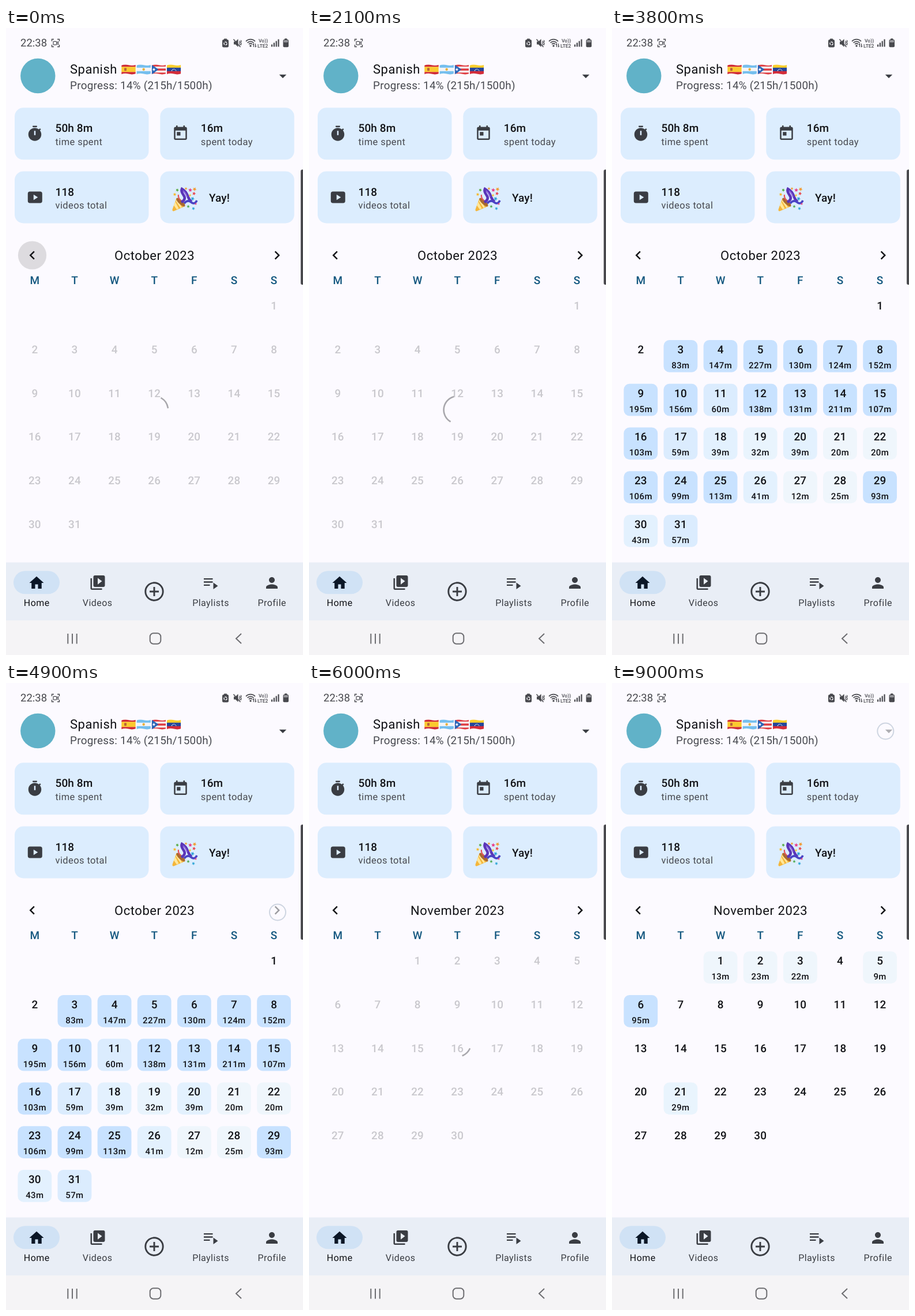
An HTML page that plays this animation: 515x1087 px, repeating every 9.1 s.

```html
<!DOCTYPE html>
<html lang="en">
<head>
<meta charset="utf-8">
<title>Watch time calendar</title>
<style>
  html, body { margin: 0; width: 100%; height: 100%; overflow: hidden; background: #fcfaff; }
  svg { display: block; width: 100%; height: 100%; font-family: Roboto, "Noto Sans", sans-serif; }
  text { text-rendering: geometricPrecision; }
  .mid { text-anchor: middle; }
  .bold { font-weight: 500; }
</style>
</head>
<body>
<svg id="stage" viewBox="0 0 515 1087" xmlns="http://www.w3.org/2000/svg"></svg>
<script>
const LOOP = 9100, STEP = 100;
const INK = "#111216", ICON = "#3a3d43", SOFT = "#47494f", SYSTEM = "#6d6d71";

const text = (s, x, y, size, fill, spacing = 0, cls = "") =>
  `<text x="${x}" y="${y}" font-size="${size}" fill="${fill}" letter-spacing="${spacing}" class="${cls}">${s}</text>`;
const box = (x, y, w, h, r, fill) =>
  `<rect x="${x}" y="${y}" width="${w}" height="${h}" rx="${r}" fill="${fill}"/>`;
const shape = (d, fill, extra = "") => `<path d="${d}" fill="${fill}" ${extra}/>`;
const line = (d, color, width, extra = "") =>
  `<path d="${d}" fill="none" stroke="${color}" stroke-width="${width}" ${extra}/>`;
const icon = (d, cx, cy, fill = ICON, scale = 1.25) =>
  `<path d="${d}" fill="${fill}" fill-rule="evenodd" transform="translate(${cx} ${cy}) scale(${scale}) translate(-12 -12)"/>`;
const group = (id, body, hidden) => `<g id="${id}"${hidden ? ' display="none"' : ""}>${body}</g>`;

const ICONS = {
  timer: "M15 1H9v2h6V1zm-4 13h2V8h-2v6zm8.03-6.61 1.42-1.42c-.43-.51-.9-.99-1.41-1.41l-1.42 1.42C16.07 4.74 14.12 4 12 4c-4.97 0-9 4.03-9 9s4.02 9 9 9 9-4.03 9-9c0-2.12-.74-4.07-1.97-5.61z",
  today: "M19 3h-1V1h-2v2H8V1H6v2H5c-1.1 0-2 .9-2 2v14c0 1.1.9 2 2 2h14c1.1 0 2-.9 2-2V5c0-1.1-.9-2-2-2zm0 16H5V8h14v11zM7 10h5v5H7z",
  play: "M5 4h14a3 3 0 0 1 3 3v10a3 3 0 0 1-3 3H5a3 3 0 0 1-3-3V7a3 3 0 0 1 3-3zm5 4.2v7.6l6-3.8z",
  prev: "M15.41 7.41 14 6l-6 6 6 6 1.41-1.41L10.83 12z",
  next: "M8.59 16.59 10 18l6-6-6-6-1.41 1.41L13.17 12z",
  drop: "M7 10l5 5 5-5z",
  home: "M10 20v-6h4v6h5v-8h3L12 3 2 12h3v8z",
  library: "M4 6H2v14c0 1.1.9 2 2 2h14v-2H4V6zm16-4H8c-1.1 0-2 .9-2 2v12c0 1.1.9 2 2 2h12c1.1 0 2-.9 2-2V4c0-1.1-.9-2-2-2zm-8 12.5v-9l6 4.5-6 4.5z",
  person: "M12 12c2.21 0 4-1.79 4-4s-1.79-4-4-4-4 1.79-4 4 1.79 4 4 4zm0 2c-2.67 0-8 1.34-8 4v2h16v-2c0-2.66-5.33-4-8-4z"
};

function statusBar() {
  const c = "#48494e";
  const bars = [4, 7, 10, 13].map((h, i) => box(460 + i * 3.8, 32.5 - h, 2.2, h, .5, c)).join("");
  const waves = [4, 7.5, 11].map(r => {
    const d = r * .72;
    return line(`M${424 - d} ${31 - d}A${r} ${r} 0 0 1 ${424 + d} ${31 - d}`, c, 1.7);
  }).join("");
  return text("22:38", 25, 32.3, 18.5, c) +
    line("M79.5 23v-3.5h3.5M89 19.5h3.5v3.5M92.5 29v3.5h-3.5M83 32.5h-3.5v-3.5", c, 1.4) +
    group("camera", `<rect x="82" y="23.3" width="5.8" height="5.8" rx="1" fill="none" stroke="${c}" stroke-width="1.2"/>` +
      line("M88 25.5l2.6-1.7v4.8l-2.6-1.7", c, 1.1)) +
    box(375, 20, 11, 13.5, 2.5, c) + box(378, 18.5, 5, 2, .5, c) +
    `<circle cx="380.5" cy="26.8" r="2.6" fill="none" stroke="#fcfaff" stroke-width="1.4" stroke-dasharray="4 1.4"/>` +
    shape("M395 23.5h3l4.5-4.5v14l-4.5-4.5h-3z", c) +
    line("M394.5 19.5l12 13.5", c, 1.5) +
    line("M404.5 22.5l1.5 1.5-1.5 2 1.5 2-1.5 2M407 21l1.2 2-1.2 2 1.2 2-1.2 3", c, 1.2) +
    waves + `<circle cx="424" cy="31" r="1.7" fill="${c}"/>` +
    line("M429.5 33v-5.5l-1.5 1.5M432.5 27v5.5l1.5-1.5", c, 1.2) +
    text("Vo))", 438, 24.5, 8.5, c, 0, "bold") + text("LTE2", 436, 33.5, 8.5, c, -.1, "bold") +
    bars + box(480.5, 20, 9.5, 13.3, 2, c) + box(483, 18.3, 4.5, 2.5, .5, c) +
    box(481.5, 21, 7.5, 4, 1, "#96969b");
}

function flags() {
  const stripes = (colors, heights) => {
    let y = -1;
    return colors.map((c, i) => {
      const h = heights[i], s = box(0, y, 25, h + .2, 0, c);
      y += h;
      return s;
    }).join("");
  };
  const list = [
    stripes(["#d02a35", "#fbc92e", "#d02a35"], [5, 9, 6]) + box(5, 6, 4, 5, 1, "#b9633a"),
    stripes(["#75bfee", "#f4f5f7", "#75bfee"], [6.5, 6, 7]) + `<circle cx="12.5" cy="8.5" r="2.2" fill="#e8b03c"/>`,
    stripes(["#df3b40", "#f6f4f5", "#df3b40", "#f6f4f5", "#df3b40"], [4.5, 3.5, 3.5, 3.5, 5]) +
      shape("M0 0L12 8.5 0 18z", "#2c65b7") +
      shape("M4 5.5l.8 2.1h2.2l-1.8 1.4.7 2.2L4 9.9l-1.9 1.3.7-2.2L1 7.6h2.2z", "#fff"),
    stripes(["#fbce2d", "#23469b", "#d32d3b"], [6.5, 6, 7]) +
      line("M8.5 11Q12.5 5 16.5 11", "#fff", 1.3, 'stroke-dasharray="1.3 1.1"')
  ];
  const wave = "M.3 1.5Q6-.8 12.5.9T24.7.8V16Q19 18 12.5 16.3T.3 16.7z";
  return `<clipPath id="wave"><path d="${wave}"/></clipPath>` +
    list.map((f, i) => `<g transform="translate(${200 + i * 26.2} 63.3)"><g clip-path="url(#wave)">${f}</g></g>`).join("");
}

function popper() {
  const star = (x, y, r, fill, turn = 0) => {
    const pts = Array.from({ length: 10 }, (_, i) => {
      const a = turn + i * Math.PI / 5, q = i % 2 ? r * .48 : r;
      return `${(x + q * Math.sin(a)).toFixed(1)},${(y - q * Math.cos(a)).toFixed(1)}`;
    });
    return `<polygon points="${pts.join(" ")}" fill="${fill}"/>`;
  };
  return shape("M289 317Q288 316 288.7 314L295.5 295Q305 299 310.5 309L291.5 317.3Q290 318 289 317z", "#f4b63a") +
    shape("M293.5 301l6 12-3.500 1.500-5-7zM297 297l8 14-2.500 1-8-12z", "#ffe79a") +
    `<ellipse cx="303" cy="302" rx="3.600" ry="10" transform="rotate(-46 303 302)" fill="#a9692f"/>` +
    line("M304 302Q313 297 308 290T305 279Q312 283 315 291T322 301", "#5a35b8", 4.6) +
    line("M307 282Q312 286 314 293", "#8b63dc", 1.8) +
    line("M309 304Q315 297 321 302T331 299", "#4a43c4", 3.6) +
    line("M303 299Q298 294 299 289", "#e6525c", 2.2) +
    star(292.5, 288.5, 3, "#f6b92e", .2) + star(297, 281, 3, "#59ad45", .4) +
    star(312, 278.5, 2.6, "#f19d36", .4) + star(319.5, 281, 3.6, "#e7418d", .1) +
    star(327, 279.5, 3.6, "#f19d36", .5) + star(326, 287, 3.2, "#e84951", .3) +
    star(319, 290, 2.6, "#f4c934", .2) + star(323.5, 296, 3.6, "#37a4d8", .4) +
    star(316, 309.5, 2.8, "#53ad56", .1) + star(325, 313, 3, "#33a8d7", .5) +
    star(329, 305, 2.2, "#e94b81", .2);
}

function cards() {
  const card = (x, y, big, small) => box(x, y, 232.5, 90, 15, "#dcedfe") +
    text(big, x + 70.5, y + 42, 19, INK, .1, "bold") + text(small, x + 70.5, y + 64.5, 16.5, SOFT, .4);
  return card(15, 138.3, "50h 8m", "time spent") + card(267.3, 138.3, "16m", "spent today") +
    card(15, 248.5, "118", "videos total") + box(267.3, 248.5, 232.5, 90, 15, "#dcedfe") +
    text("Yay!", 352, 301.3, 19, INK, .1, "bold") +
    icon(ICONS.timer, 50, 183.3) + icon(ICONS.today, 302.5, 182.8) + icon(ICONS.play, 50.3, 293.5) + popper();
}

const colX = col => 49.8 + col * 69.13;
const rowY = row => 465.2 + row * 75.75;
const SHADES = [[75, "#c8e2ff"], [45, "#dbecfe"], [35, "#e3f1fe"], [27, "#e9f4fd"], [0, "#eff6fc"]];

function month(first, days, minutes) {
  let out = "";
  for (let day = 1; day <= days; day++) {
    const slot = first + day - 1, x = colX(slot % 7), y = rowY(Math.floor(slot / 7));
    const m = minutes && minutes[day];
    if (m) {
      out += box(x - 29.4, y, 58.8, 55.8, 10, SHADES.find(s => m >= s[0])[1]) +
        text(m + "m", x, y + 49, 15, INK, .4, "mid bold");
    }
    out += text(day, x, y + 23, 18.9, minutes ? INK : "#c9c8cd", .1, "mid bold");
  }
  return out;
}

const OCT = [0, 0, 0, 83, 147, 227, 130, 124, 152, 195, 156, 60, 138, 131, 211, 107, 103, 59, 39, 32, 39,
  20, 20, 106, 99, 113, 41, 12, 25, 93, 43, 57];
const NOV = { 1: 13, 2: 23, 3: 22, 5: 9, 6: 95, 21: 29 };

function calendar() {
  const week = [..."MTWTFSS"].map((d, i) => text(d, colX(i), 444.3, 19, "#12577f", 0, "mid bold")).join("");
  const title = (id, s) => group(id, text(s, 257.6, 402.3, 22, INK, .55, "mid"), true);
  return `<circle id="ripple" cy="394" fill="#000"/>` +
    icon(ICONS.prev, 45.5, 394, INK) + icon(ICONS.next, 470, 394, INK) + week +
    title("octTitle", "October 2023") + title("novTitle", "November 2023") +
    group("octWait", month(6, 31), true) + group("octDone", month(6, 31, OCT), true) +
    group("novWait", month(2, 30), true) + group("novDone", month(2, 30, NOV), true) +
    `<path id="spinner" fill="none" stroke="#a8a7ac" stroke-width="2.6" stroke-linecap="square"/>`;
}

function tabs() {
  const label = (s, x, fill = ICON) => text(s, x, 1002.3, 16, fill, .45, "mid");
  return box(0, 926.5, 515, 101, 0, "#e9eef6") + box(13, 941.3, 80, 40, 20, "#d0e2f5") +
    icon(ICONS.home, 53, 962, "#0b1727") + icon(ICONS.library, 159, 961.5) +
    `<circle cx="257" cy="977" r="15.2" fill="none" stroke="${ICON}" stroke-width="2.9"/>` +
    line("M257 969v16M249 977h16", ICON, 2.9) +
    line("M343 955.2h15.5M343 960.5h15.5M343 965.8h10.5", ICON, 2.3) +
    shape("M359.5 961.5v11.5l8-5.7z", ICON) + icon(ICONS.person, 461, 962) +
    label("Home", 53.3, INK) + label("Videos", 158.7) + label("Playlists", 355) + label("Profile", 461.2) +
    box(0, 1027, 515, 60, 0, "#f5f4f6") +
    line("M107.3 1050v17.5M115 1050v17.5M122.7 1050v17.5", SYSTEM, 2) +
    `<rect x="249.7" y="1049.2" width="18.6" height="18.6" rx="6" fill="none" stroke="${SYSTEM}" stroke-width="2"/>` +
    line("M408 1050l-9 8.5 9 8.5", SYSTEM, 2);
}

document.getElementById("stage").innerHTML =
  box(0, 0, 515, 1087, 0, "#fcfaff") + statusBar() +
  `<circle cx="55.3" cy="83" r="30.2" fill="#61b2c8"/>` +
  text("Spanish", 111, 79.3, 22, INK, .5) + flags() +
  text("Progress: 14% (215h/1500h)", 111, 105.8, 18.9, SOFT, .25) +
  icon(ICONS.drop, 480, 83.2) + cards() + calendar() + tabs() +
  shape("M515 245.5h-1.5q-2.5 0-2.5 3V442q0 3 2.5 3h1.5z", "#4b4b4f") +
  `<circle id="touch" r="14" fill="#fcfaff" fill-opacity=".6" stroke="#ced5e1" stroke-width="2"/>`;

const el = id => document.getElementById(id);
const show = (id, on) => el(id).setAttribute("display", on ? "inline" : "none");
const set = (id, attrs) => { for (const k in attrs) el(id).setAttribute(k, attrs[k]); };
const clamp = v => Math.max(0, Math.min(1, v));

// cubic-bezier(.4, 0, .2, 1)
function ease(x) {
  let lo = 0, hi = 1;
  for (let i = 0; i < 24; i++) {
    const s = (lo + hi) / 2, r = 1 - s;
    if (1.2 * s * r * r + .6 * s * s * r + s * s * s < x) lo = s; else hi = s;
  }
  return lo * lo * (3 - 2 * lo);
}

// Material indeterminate ring: steady turn, head runs first, tail follows.
function spinnerPath(time, cx, cy) {
  const TURN = 1332, R = 23.7;
  const cycle = Math.floor(time / TURN), u = time / TURN - cycle;
  const head = 290 * ease(clamp(u * 2)), tail = 290 * ease(clamp(u * 2 - 1));
  const base = 216 * cycle + 286 * u, sweep = Math.max(.5, head - tail);
  const at = deg => {
    const a = deg * Math.PI / 180;
    return `${(cx + R * Math.sin(a)).toFixed(2)} ${(cy - R * Math.cos(a)).toFixed(2)}`;
  };
  return `M${at(base + tail)}A${R} ${R} 0 ${sweep > 180 ? 1 : 0} 1 ${at(base + tail + sweep)}`;
}

function render(t) {
  const nov = t >= 5000;
  const waiting = nov ? t < 7800 : t < 3800;
  const since = nov ? t - 4946 : t + 146;

  show("octTitle", !nov);
  show("novTitle", nov);
  show("octWait", !nov && waiting);
  show("octDone", !nov && !waiting);
  show("novWait", nov && waiting);
  show("novDone", nov && !waiting);

  show("spinner", waiting);
  if (waiting) set("spinner", { d: spinnerPath(since, 257.3, nov ? 624 : 662) });

  set("ripple", {
    cx: nov ? 470 : 45.5,
    r: 10 + 14.6 * ease(clamp((since + 10) / 140)),
    opacity: .125 * (1 - clamp((since - 150) / 200))
  });

  show("camera", (t + 700) % 1000 >= 500);

  const tapNext = t >= 4900 && t < 5000, tapMenu = t >= 9000;
  show("touch", tapNext || tapMenu);
  set("touch", tapMenu ? { cx: 474.3, cy: 83.5 } : { cx: 471, cy: 397.5 });
}

const start = performance.now();
function tick(now) {
  const t = Math.max(0, now - start) % LOOP;
  render(Math.floor(t / STEP) * STEP);
  requestAnimationFrame(tick);
}
render(0);
requestAnimationFrame(tick);
</script>
</body>
</html>
```
